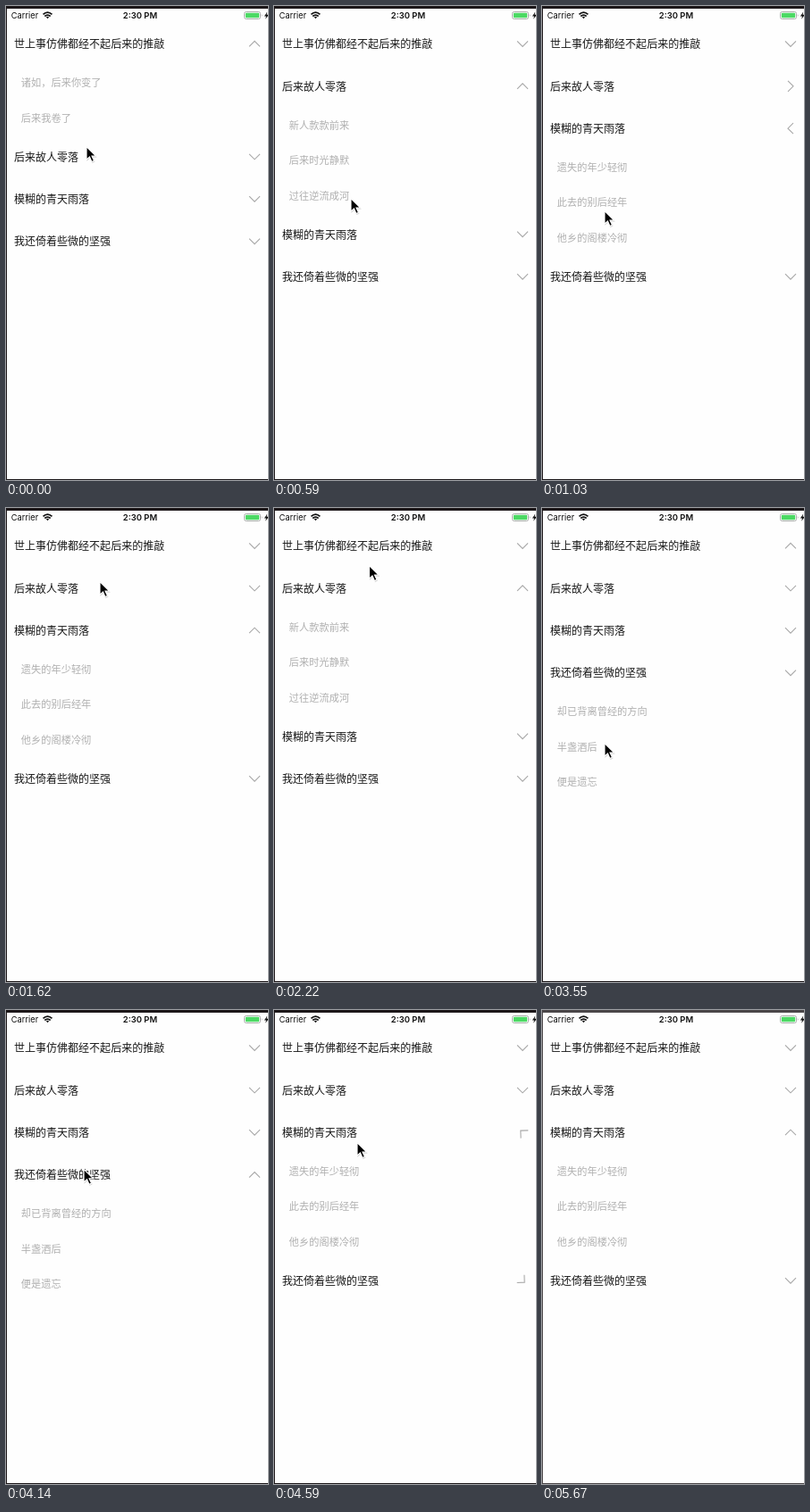
Write an HTML page that moves like this. It is 293 by 531 pixels and loops after 5770 ms.

```html
<!DOCTYPE html>
<html lang="zh-CN">
<head>
<meta charset="utf-8">
<title>Accordion</title>
<style>
  html, body { margin: 0; width: 100%; height: 100%; overflow: hidden; background: #fefefe; }
  svg { display: block; width: 100vw; height: 100vh; }
  text { font-family: "Noto Sans CJK SC", "Noto Sans CJK", sans-serif; }
  .title { font-size: 12.03px; fill: #181818; }
  .item { font-size: 11.22px; fill: #b0b0b0; }
  .chevron { fill: none; stroke: #a8a8a8; stroke-width: 1.1; }
  .status { font-family: Inter, sans-serif; fill: #111; }
  .edge { fill: #1c1719; }
  .faded .edge { fill: #4a4648; }
</style>
</head>
<body>
<svg id="stage" viewBox="0 0 293 531">
  <rect width="293" height="531" fill="#fefefe"/>

  <text class="status" x="5.8" y="14.2" font-size="9.3">Carrier</text>
  <text class="status" x="150" y="14.2" font-size="9.5" font-weight="600" text-anchor="middle">2:30 PM</text>
  <g fill="none" stroke="#111" stroke-width="1.7">
    <path d="M41.5 9.4Q46.5 4.9 51.5 9.4"/>
    <path d="M43.3 11.5Q46.5 8.7 49.7 11.5"/>
    <path d="M46.5 14.2L44.9 12.5Q46.5 11.2 48.1 12.5Z" fill="#111" stroke="none"/>
  </g>
  <rect x="266.5" y="6.5" width="18" height="8" rx="2" fill="none" stroke="#a6a6a6" stroke-width=".9"/>
  <rect x="267.8" y="7.8" width="15.4" height="5.4" rx="1" fill="#4cd964"/>
  <path d="M285.8 9Q287.4 10.5 285.8 12Z" fill="#a6a6a6"/>
  <path d="M292.2 6.5L288.9 11.4H291L290.2 14.8L294 9.8H291.6Z" fill="#111"/>

  <g id="list"></g>

  <g id="cursor">
    <path d="M0 0V15.5L3.7 12.2L6.3 18L9 16.8L6.4 11.2H11.3Z" transform="translate(.6 1.6) scale(.94)" fill="#000" stroke="#000" opacity=".15"/>
    <path d="M0 0V15.5L3.7 12.2L6.3 18L9 16.8L6.4 11.2H11.3Z" transform="translate(0 .5) scale(.94)" fill="#000" stroke="#fff" stroke-width="1.2"/>
  </g>

  <rect class="edge" width="293" height="3"/>
  <rect class="edge" width="1" height="531"/>
  <rect class="edge" y="530" width="293" height="1"/>
</svg>
<script>
const LOOP = 5770, TICK = 148, FADE_AT = 5670;
const TITLE_Y = 42.6, TITLE_STEP = 47.4, ITEM_GAP = 43.5, ITEM_STEP = 39.5;

const sections = [
  ["世上事仿佛都经不起后来的推敲", "诸如，后来你变了", "后来我卷了"],
  ["后来故人零落", "新人款款前来", "后来时光静默", "过往逆流成河"],
  ["模糊的青天雨落", "遗失的年少轻彻", "此去的别后经年", "他乡的阁楼冷彻"],
  ["我还倚着些微的坚强", "却已背离曾经的方向", "半盏酒后", "便是遗忘"]
];

// tick, section opened, chevron turn reached within that tick
const clicks = [
  [0, 0, 180], [1, 1, 90], [7, 2, 90], [13, 1, 90],
  [19, 0, 75], [24, 3, 0], [31, 2, 133]
];

// tick, x, y
const path = [
  [0, 90, 157], [2, 90, 157], [4, 86, 215], [6, 70, 229], [8, 70, 229],
  [11, 105, 82], [14, 105, 82], [16, 108, 46], [20, 108, 46], [24, 70, 263],
  [26, 70, 263], [29, 93, 148], [32, 93, 148], [36, 100, 536], [40, 100, 536]
];

const stage = document.getElementById("stage");
const list = document.getElementById("list");
const cursor = document.getElementById("cursor");

function add(parent, tag, attrs = {}, content = "") {
  const el = document.createElementNS(stage.namespaceURI, tag);
  for (const key in attrs) el.setAttribute(key, attrs[key]);
  el.textContent = content;
  return parent.appendChild(el);
}

const rows = sections.map(([title, ...items]) => {
  const group = add(list, "g");
  add(group, "text", { class: "title", x: 9, y: 4.6 }, title);
  const chevron = add(group, "path", { class: "chevron", d: "M-6-3L0 3L6-3" });
  const body = add(group, "g");
  items.forEach((item, i) =>
    add(body, "text", { class: "item", x: 16.8, y: ITEM_GAP + i * ITEM_STEP + 4.1 }, item));
  return { group, chevron, body, height: items.length * ITEM_STEP };
});

function drawList(tick) {
  const current = clicks.findLastIndex(([at]) => at <= tick);
  const [at, open, turn] = clicks[current];
  const swing = tick === at ? turn : 180;
  const closing = current > 0 ? clicks[current - 1][1] : -1;
  rows.forEach((row, i) => {
    const y = TITLE_Y + i * TITLE_STEP + (i > open ? rows[open].height : 0);
    const angle = i === open ? swing : i === closing ? 180 + swing : 0;
    row.group.setAttribute("transform", `translate(0 ${y})`);
    row.chevron.setAttribute("transform", `translate(278 -.2) rotate(${angle})`);
    row.body.setAttribute("display", i === open ? "inline" : "none");
  });
}

function drawCursor(tick) {
  const i = path.findLastIndex(([at]) => at <= tick);
  const [t0, x0, y0] = path[i];
  const [t1, x1, y1] = path[i + 1];
  const p = (tick - t0) / (t1 - t0);
  const ease = p * p * (3 - 2 * p);
  cursor.setAttribute("transform", `translate(${x0 + (x1 - x0) * ease} ${y0 + (y1 - y0) * ease})`);
}

const start = performance.now();

function frame() {
  const time = (performance.now() - start) % LOOP;
  const tick = Math.floor((time + 10) / TICK);
  drawList(tick);
  drawCursor(tick);
  stage.classList.toggle("faded", time >= FADE_AT);
  requestAnimationFrame(frame);
}
frame();
</script>
</body>
</html>
```
